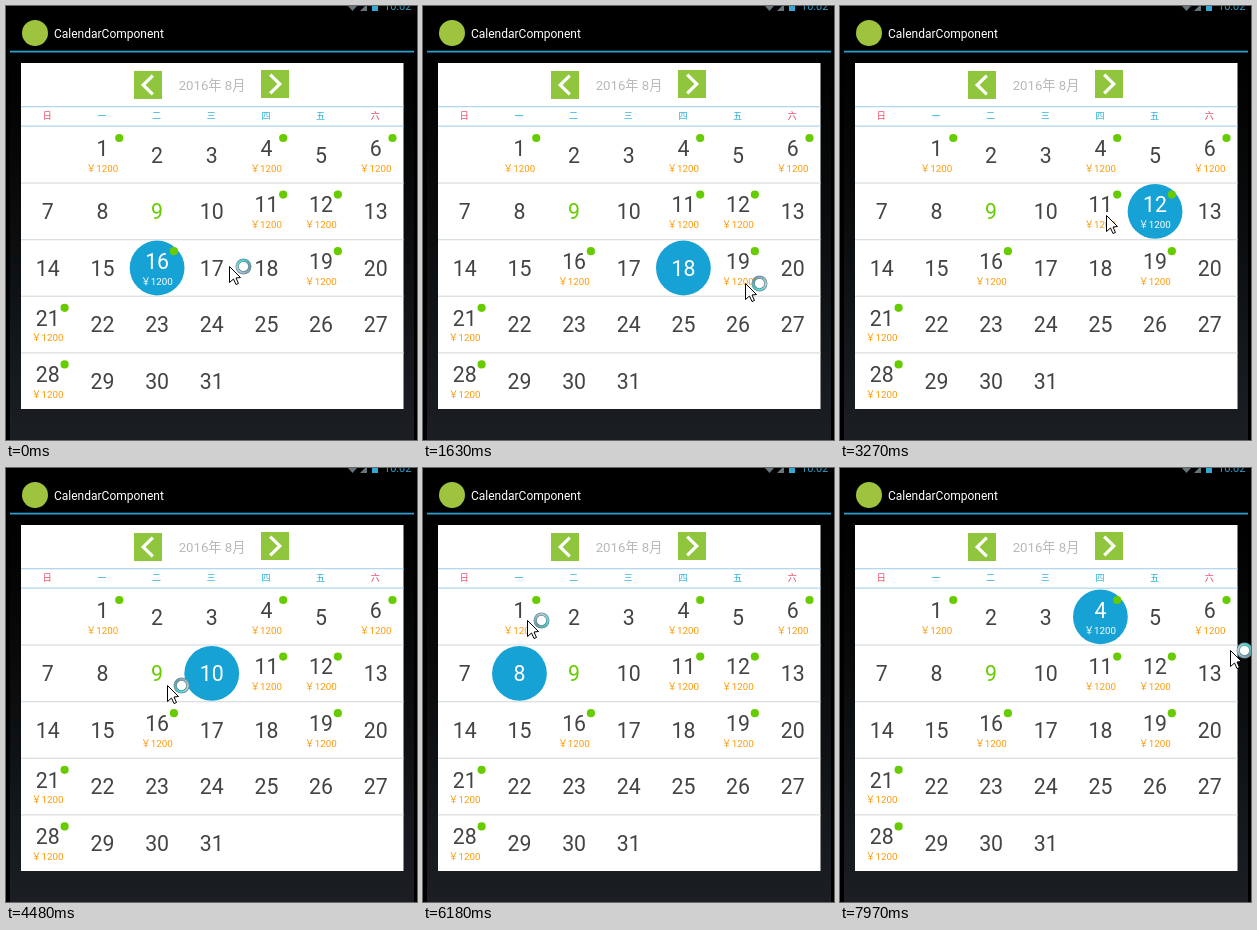
These frames come from a looping animation (411x434 px, 8000 ms). An HTML page with a canvas:

```html
<!DOCTYPE html>
<html lang="zh">
<head>
<meta charset="utf-8">
<title>Calendar</title>
<style>
html, body { margin: 0; width: 100%; height: 100%; overflow: hidden; background: #000; }
canvas { display: block; }
</style>
</head>
<body>
<canvas id="stage" width="411" height="434"></canvas>
<script>
const ctx = document.getElementById('stage').getContext('2d');
const LOOP = 8000, TICK = 121; // ms; the screen refreshes once per tick
const FONT = 'Roboto, "Noto Sans CJK SC", "Noto Sans CJK JP", "Noto Sans CJK", sans-serif';
const BLUE = '#17a2d6', GREEN = '#66cc00', ORANGE = '#ff9a0a';
const CARD = { x: 15, y: 57, w: 382.5, h: 346 };
const GRID = { x: 41.8, y: 148.8, dx: 54.65, dy: 56.6 };
const PRICED = new Set([1, 4, 6, 11, 12, 16, 19, 21, 28]);
const FIRST_PICK = 16, TODAY = 9, TAP_LAG = 4;

// Pointer stops, times in ticks; a tap picks the day under the pointer.
const stop = (at, x, y) => ({ at, x, y });
const tap = (at, x, y) => ({ at, x, y, tapped: true });
const route = [
  tap(0, 223, 260), tap(4, 255, 262), stop(8, 296, 290), stop(11, 336, 310),
  tap(14, 315, 260), tap(19, 316, 204), tap(24, 285, 206), stop(27, 266, 209),
  stop(29, 232, 272), stop(31, 232, 272), tap(33, 200, 222), stop(37, 161, 217),
  tap(39, 145, 228), tap(44, 100, 230), stop(49, 95, 187), tap(51, 104, 152),
  tap(59, 258, 152), stop(65, 390, 182)
];

function pointerAt(tick) {
  const next = route.findIndex(p => p.at > tick);
  if (next < 0) return route[route.length - 1];
  const a = route[next - 1], b = route[next];
  const k = (tick - a.at) / (b.at - a.at);
  return { x: Math.round(a.x + (b.x - a.x) * k), y: Math.round(a.y + (b.y - a.y) * k) };
}

const dayUnder = ({ x, y }) =>
  Math.round((x - GRID.x) / GRID.dx) + 7 * Math.round((y - GRID.y) / GRID.dy);

function pickedAt(tick) {
  const done = route.filter(p => p.tapped && p.at + TAP_LAG <= tick);
  return done.length ? dayUnder(done[done.length - 1]) : FIRST_PICK;
}

function rect(x, y, w, h, color) {
  ctx.fillStyle = color;
  ctx.fillRect(x, y, w, h);
}

function disc(x, y, r, color) {
  ctx.fillStyle = color;
  ctx.beginPath();
  ctx.arc(x, y, r, 0, Math.PI * 2);
  ctx.fill();
}

function text(str, x, y, size, color, align = 'center') {
  ctx.font = `${size}px ${FONT}`;
  ctx.textAlign = align;
  ctx.fillStyle = color;
  ctx.fillText(str, x, y);
}

function trace(points) {
  ctx.beginPath();
  points.forEach(([x, y]) => ctx.lineTo(x, y));
}

function fillShape(points, color) {
  trace(points);
  ctx.fillStyle = color;
  ctx.fill();
}

function drawChrome() {
  rect(0, 0, 411, 434, '#000');
  const shade = ctx.createLinearGradient(0, 46, 0, 434);
  shade.addColorStop(0, '#000');
  shade.addColorStop(0.35, '#07090a');
  shade.addColorStop(1, '#1b1f24');
  rect(4, 46, 404, 388, shade);

  // Status bar, cut off by the top edge
  fillShape([[342, 0], [351, 0], [346.5, 5]], '#66757c');
  fillShape([[354, 5], [361, 5], [361, 0], [359, 0]], '#66757c');
  rect(366, 0, 6, 5, '#33a9d6');
  text('10:02', 378, 4, 11, '#2f9fca', 'left');

  disc(29, 27, 13, '#9dc33f');
  text('CalendarComponent', 48, 32, 12, '#fff', 'left');
  rect(4, 44.7, 404, 1.8, '#2d9dc9');
}

function drawArrow(x, y, dir) {
  rect(x, y, 28, 28, '#90c63d');
  const cx = x + 14, cy = y + 14, reach = 4.8 * dir;
  trace([[cx - reach, cy - 9.3], [cx + reach, cy], [cx - reach, cy + 9.3]]);
  ctx.strokeStyle = '#fff';
  ctx.lineWidth = 3.2;
  ctx.stroke();
}

function drawDay(day, picked) {
  const x = GRID.x + GRID.dx * (day % 7);
  const y = GRID.y + GRID.dy * Math.floor(day / 7);
  const on = day === picked;
  const priced = PRICED.has(day);
  if (on) disc(x, y, 27.4, BLUE);
  text(day, x, y + (priced ? 0.9 : 7.7), 21.3, on ? '#fff' : day === TODAY ? GREEN : '#444');
  if (!priced) return;
  const color = on ? '#fff' : ORANGE;
  text('￥', x - 11.3, y + 16.7, 9.8, color);
  text('1200', x - 6.3, y + 16.7, 9.8, color, 'left');
  disc(x + 16.8, y - 16.8, 4.1, GREEN);
}

function drawCalendar(picked) {
  rect(CARD.x, CARD.y, CARD.w, CARD.h, '#fff');
  drawArrow(128, 65, -1);
  drawArrow(255, 64, 1);
  text('2016年 8月', 206, 83.5, 13.2, '#b8b8b8');
  for (const y of [100, 119.5]) rect(CARD.x, y, CARD.w, 1.3, '#b3d8ee');
  [...'日一二三四五六'].forEach((name, i) =>
    text(name, GRID.x + GRID.dx * i - 0.5, 113.4, 9, i % 6 ? '#20aedb' : '#ef3f5c'));
  for (let row = 0; row < 4; row++)
    rect(CARD.x, GRID.y + GRID.dy * (row + 0.5) - 0.7, CARD.w, 1.3, '#dcdfe1');
  for (let day = 1; day <= 31; day++) drawDay(day, picked);
}

function drawBusyRing(x, y, turn) {
  const sheen = ctx.createConicGradient(turn * Math.PI * 2, x, y);
  sheen.addColorStop(0, '#6d97a6');
  sheen.addColorStop(0.4, '#b9d0da');
  sheen.addColorStop(0.7, '#3fdcd0');
  sheen.addColorStop(1, '#6d97a6');
  disc(x, y, 8, '#6f929e');
  disc(x, y, 7.2, sheen);
  disc(x, y, 5.4, '#5c8793');
  disc(x, y, 4.7, '#fff');
}

function drawPointer(tick) {
  const { x, y } = pointerAt(tick);
  const busy = tick < 25 || tick > 32;
  ctx.save();
  ctx.translate(x + 0.5, y + 0.5);
  if (busy) drawBusyRing(14, 0, tick / 8);
  fillShape([[0, 0], [0, 16], [4, 12.5], [6.5, 18], [9, 17], [6.5, 11.5], [11, 11]], '#fff');
  ctx.closePath();
  ctx.strokeStyle = '#000';
  ctx.lineWidth = 1;
  ctx.stroke();
  ctx.restore();
}

function frame() {
  const tick = Math.floor(performance.now() % LOOP / TICK);
  drawChrome();
  drawCalendar(pickedAt(tick));
  drawPointer(tick);
  requestAnimationFrame(frame);
}
frame();
</script>
</body>
</html>
```
